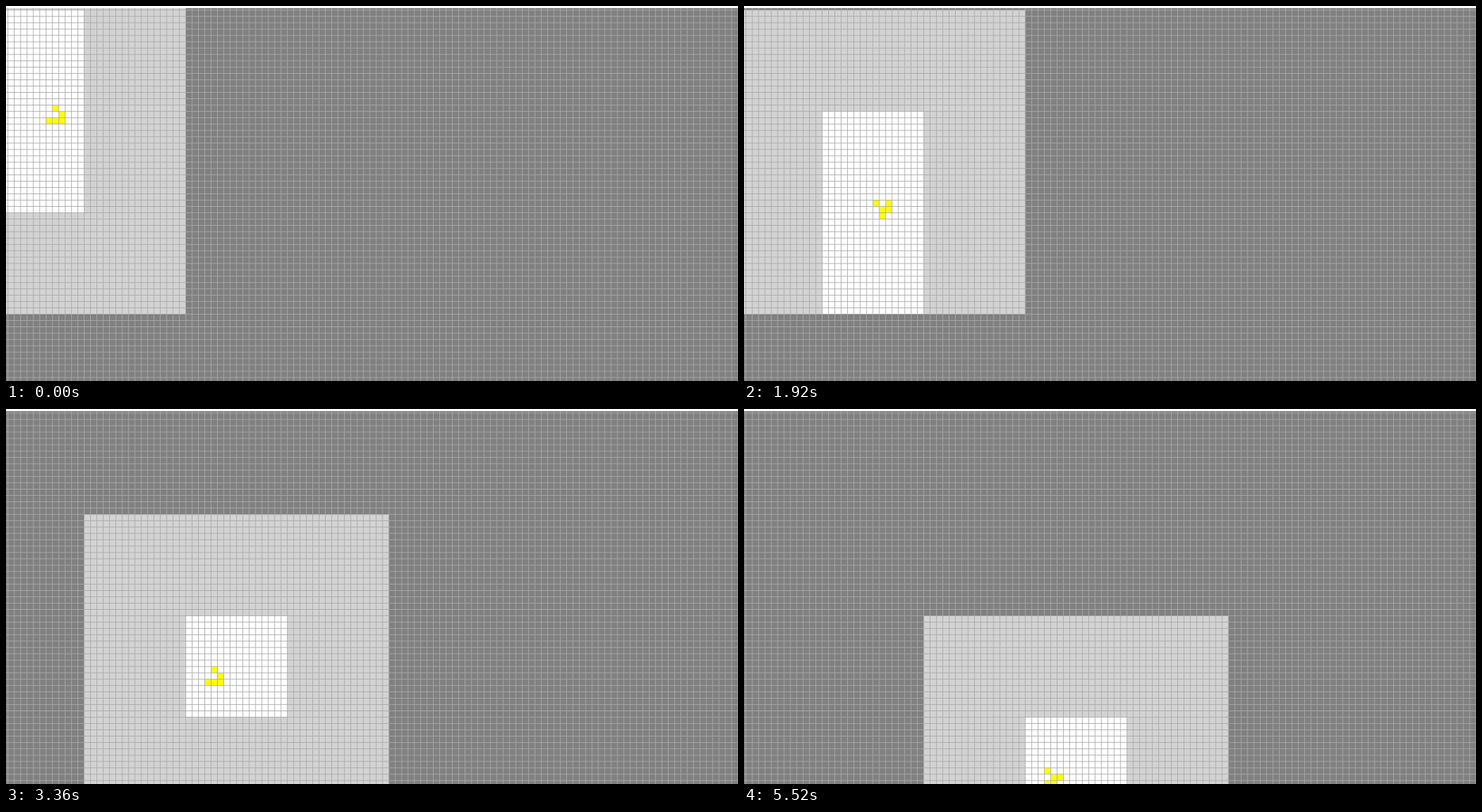
These frames come from a looping animation (1044x536 px, 5590 ms). An HTML page with a canvas:

```html
<!DOCTYPE html>
<html lang="en">
<head>
<meta charset="utf-8">
<title>Glider on a chunked grid</title>
<style>
  html, body { margin: 0; width: 100%; height: 100%; overflow: hidden; background: #fff; }
  canvas { display: block; }
</style>
</head>
<body>
<canvas id="stage" width="1044" height="536"></canvas>
<script>
const ctx = document.getElementById('stage').getContext('2d');
const WIDTH = 1044, HEIGHT = 536, TOP = 3;
const CELL = 9.055, LINE = 0.9, CHUNK = 16;
const ORIGIN_X = 111.43, ORIGIN_Y = 150.7;
const LOOP = 5590, STEP = 80, LAST_STEP = 69;
const GENERATIONS_PER_STEP = 2.362, HEAD_START = 0.85;

// The four poses of a glider, with the offset of each pose's box.
const POSES = [
  { dx: 0, dy: 0, rows: ['.O.', '..O', 'OOO'] },
  { dx: 0, dy: 1, rows: ['O.O', '.OO', '.O.'] },
  { dx: 0, dy: 1, rows: ['..O', 'O.O', '.OO'] },
  { dx: 1, dy: 1, rows: ['O..', '.OO', 'OO.'] },
];

const xAt = col => ORIGIN_X + col * CELL;
const yAt = row => ORIGIN_Y + row * CELL;

function gliderCells(generation) {
  const shift = Math.floor(generation / 4);
  const { dx, dy, rows } = POSES[generation - shift * 4];
  const cells = [];
  rows.forEach((line, r) => [...line].forEach((mark, c) => {
    if (mark === 'O') cells.push([c + dx + shift - 6, r + dy + shift - 1]);
  }));
  return cells;
}

const chunksOf = cells =>
  cells.map(cell => cell.map(n => Math.floor(n / CHUNK)));

function fillCells(col, row, size, color) {
  const left = Math.round(xAt(col)), right = Math.round(xAt(col + size));
  const top = Math.max(TOP, Math.round(yAt(row)));
  const bottom = Math.round(yAt(row + size));
  ctx.fillStyle = color;
  if (bottom > top) ctx.fillRect(left, top, right - left, bottom - top);
}

const fillChunk = (cx, cy, color) =>
  fillCells(cx * CHUNK, cy * CHUNK, CHUNK, color);

function drawGrid() {
  ctx.fillStyle = '#a9a9a9';
  for (let x = xAt(-13); x < WIDTH + 1; x += CELL)
    ctx.fillRect(x - LINE / 2, TOP, LINE, HEIGHT - TOP);
  for (let y = yAt(-16); y < HEIGHT + 1; y += CELL)
    ctx.fillRect(0, y - LINE / 2, WIDTH, LINE);
}

function draw(generation) {
  const cells = gliderCells(generation);
  ctx.fillStyle = '#fff';
  ctx.fillRect(0, 0, WIDTH, TOP);
  ctx.fillStyle = '#808080';
  ctx.fillRect(0, TOP, WIDTH, HEIGHT - TOP);

  // Neighbours wake up one generation after their chunk becomes alive.
  for (const [cx, cy] of chunksOf(gliderCells(generation - 1)))
    for (let dx = -1; dx <= 1; dx++)
      for (let dy = -1; dy <= 1; dy++)
        fillChunk(cx + dx, cy + dy, '#d3d3d3');

  for (const [cx, cy] of chunksOf(cells)) fillChunk(cx, cy, '#fff');
  for (const [col, row] of cells) fillCells(col, row, 1, '#ff0');
  drawGrid();
}

const start = performance.now();
let shown = -1;

function tick() {
  const time = Math.max(0, performance.now() - start) % LOOP;
  const step = Math.min(LAST_STEP, Math.floor(time / STEP));
  if (step !== shown) {
    shown = step;
    draw(Math.floor(step * GENERATIONS_PER_STEP + HEAD_START));
  }
  requestAnimationFrame(tick);
}
tick();
</script>
</body>
</html>
```
